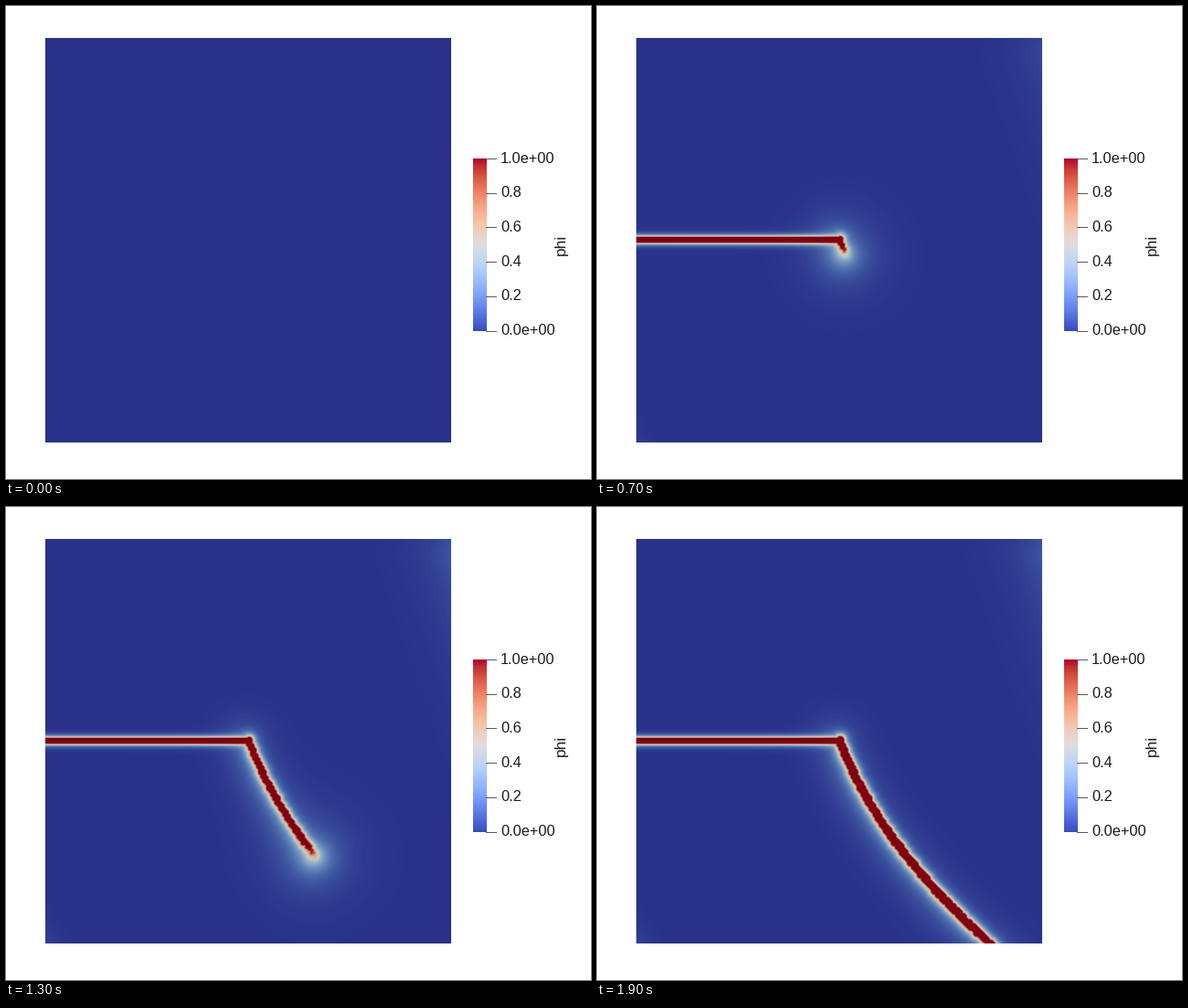
These frames come from a looping animation (640 by 518 pixels, 2000 ms). A matplotlib script:

```python
import numpy as np
import matplotlib.pyplot as plt
from matplotlib.animation import FuncAnimation
from matplotlib.colors import LinearSegmentedColormap

W, H, DPI = 640, 518, 100
LEFT, RIGHT, TOP, BOTTOM = 43, 487, 35, 478
NOTCH_X, NOTCH_Y = 266, 256
FRAMES, STEP_MS = 20, 100
CELL = 2.2

# Shaded diverging map of the plate
PLATE = LinearSegmentedColormap.from_list("plate", [
    (0.00, "#29318a"), (0.12, "#4460a6"), (0.30, "#7b9fc6"),
    (0.48, "#bccbc8"), (0.60, "#d9b898"), (0.76, "#c76f50"),
    (0.90, "#a01f25"), (1.00, "#7e0214")], N=512)

X, Y = np.meshgrid(np.arange(LEFT, RIGHT) + 0.5,
                   np.arange(TOP, BOTTOM) + 0.5)
X, Y = X.astype(np.float32), Y.astype(np.float32)


def path_x(depth):
    return NOTCH_X + 0.362 * depth + 0.0017 * depth ** 2


def tip_depth(k):
    return np.interp(k, [3, 4, 6, 7, 8, 9, 11, 13, 15, 17, 18, 19],
                     [0, 1, 6, 14, 30, 48, 84, 124, 164, 203, 220, 233])


def snap(v):
    return np.round(v / CELL) * CELL


def notch():
    dx = np.maximum(X - NOTCH_X, 0)
    dy = np.maximum(np.abs(Y - NOTCH_Y) - 2.8, 0)
    return np.hypot(dx, dy) / 2.1


def corners(k):
    grow = min(1, k / 9) ** 2
    upper = 0.10 * np.exp(-(RIGHT - X) / 30 - np.abs(Y - 52) / 85)
    lower = 0.05 * np.exp(-(X - LEFT) / 16 - (BOTTOM - Y) / 24)
    return grow * (upper + lower)


def crack(depth, widen):
    """Scaled distance to the crack core and plain distance to its halo."""
    core = notch()
    halo = np.full_like(X, 1e6)
    for d in np.arange(0, depth, 1.6):
        left = (depth - d) * 1.2
        radius = (2.8 + widen) * np.clip(0.35 + left / 32, 0, 1)
        loss = -np.log(np.clip(0.6 + left / 18, 0, 1))
        px, py = path_x(d), NOTCH_Y + d
        gap = np.hypot(X - snap(px), Y - snap(py))
        core = np.minimum(core, np.maximum(gap - radius, 0) / 2.9 + loss)
        halo = np.minimum(halo, (X - px + 5) ** 2 + (Y - py - 3) ** 2)
    return core, np.sqrt(halo)


def field(k):
    if k == 0:
        return np.zeros_like(X)
    depth = tip_depth(k)
    core, halo = crack(depth, 0.7 * np.clip((k - 13) / 6, 0, 1))
    phi = np.exp(-core)

    side = 0.24 * np.exp(-halo / 15)
    strength = np.clip(k / 9, 0, 1) ** 1.5 * np.clip((228 - depth) / 30, 0, 1)
    tip = np.hypot(X - path_x(depth) - 2, Y - NOTCH_Y - depth - 3)
    glow = side + strength * (0.28 * np.exp(-tip / 9) + 0.13 * np.exp(-tip / 30))
    return phi + (1 - phi) * (glow + corners(k))


def draw_legend():
    x0, x1, y0, y1 = 511, 526, 167, 356
    ax.imshow(np.linspace(1, 0, 256)[:, None], cmap="coolwarm",
              extent=(x0, x1, y1, y0), aspect="auto")
    labels = ["1.0e+00", "0.8", "0.6", "0.4", "0.2", "0.0e+00"]
    for y, label in zip(np.linspace(y0, y1 - 0.5, 6), labels):
        ax.plot([x1 - 1, x1 + 10], [y, y], color="#555555", lw=0.7)
        ax.text(541, y + 4.6, label, **font, fontsize=16.4 * 72 / DPI)
    ax.text(614.5, 261, "phi", **font, fontsize=17.2 * 72 / DPI,
            rotation=90, ha="right", va="center")


fig = plt.figure(figsize=(W / DPI, H / DPI), dpi=DPI, facecolor="white")
ax = fig.add_axes([0, 0, 1, 1])
font = dict(family="Liberation Sans", color="#1c1c1c")
plate = ax.imshow(field(0), cmap=PLATE, vmin=0, vmax=1, aspect="auto",
                  extent=(LEFT, RIGHT, BOTTOM, TOP), interpolation="nearest")
draw_legend()
ax.set_xlim(0, W)
ax.set_ylim(H, 0)
ax.axis("off")


def update(k):
    plate.set_data(field(k))
    return [plate]


anim = FuncAnimation(fig, update, frames=FRAMES, interval=STEP_MS,
                     init_func=lambda: update(0), repeat=True,
                     repeat_delay=0, blit=False)
plt.show()
```
